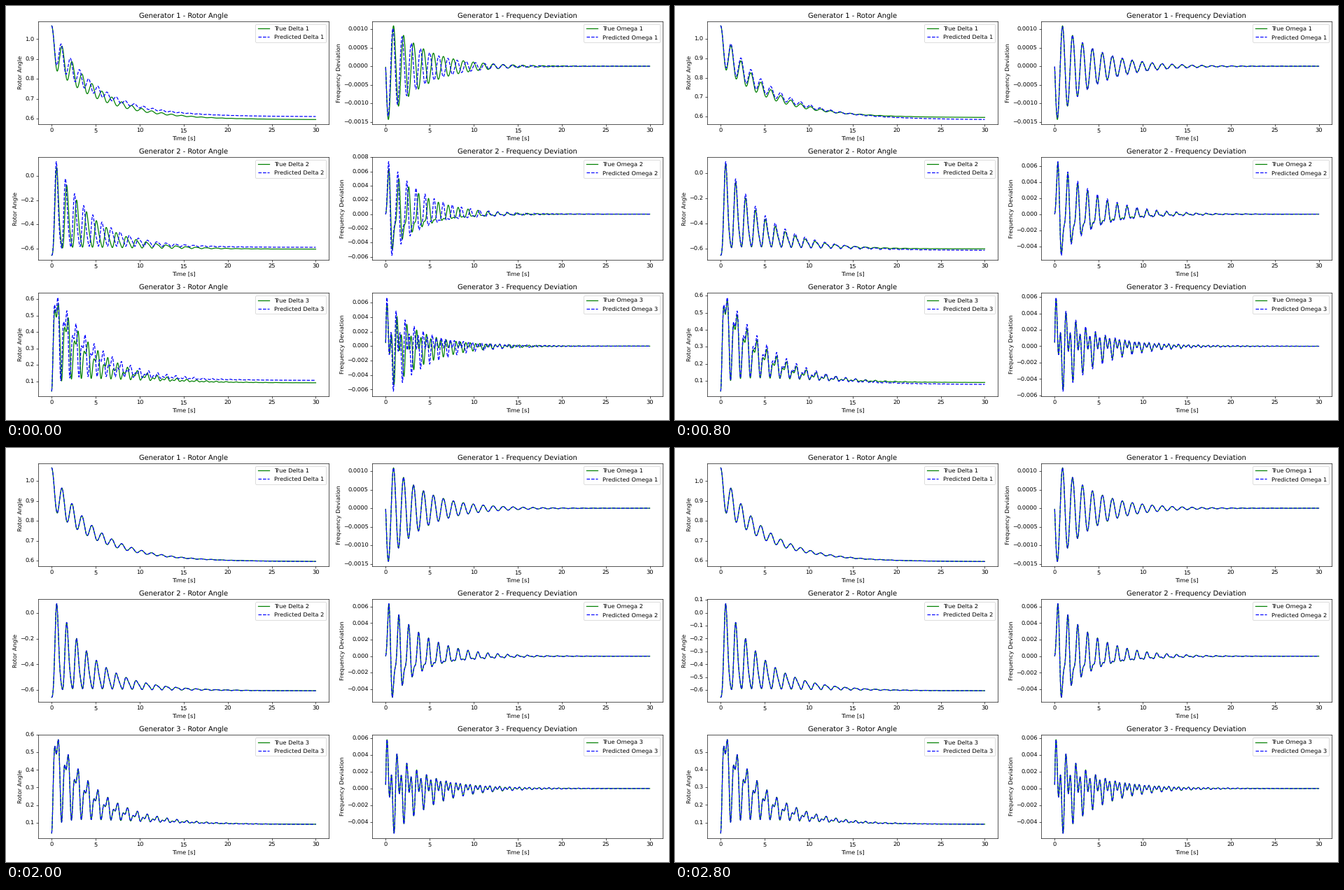
A matplotlib script that plays this animation: 947x592 px, repeating every 4.3 s.

```python
import numpy as np
import matplotlib.pyplot as plt
from matplotlib.animation import FuncAnimation

W, H = 947, 592
DPI = W / 16
STEP, FRAMES = 100, 43       # ms per frame, frames per loop
EPOCHS, HOLD = 8, 4          # fits shown, frames per fit; the last one stays

LEFT, TOP = 46.3, 21.6
WIDTH, HEIGHT = 415.0, 147.4
COLUMN, ROW = 477.1, 194.3   # pitch of the panel grid

plt.rcParams["text.hinting"] = "none"

t = np.linspace(0, 30, 3001)

# start, end: rotor angle; slow, fast: size, phase and decay of the two modes;
# drift: decay of the mean; lag: late start of the mean; gain: first size error
MACHINES = [
    dict(start=1.067, end=0.595, slow=(0.1, 0.197, 0.25), fast=(0, 0, 0),
         drift=0.2, lag=0, gain=-0.15),
    dict(start=-0.656, end=-0.605, slow=(-0.389, 0.087, 0.26),
         fast=(0.068, 0, 0.235), drift=0.21, lag=0.083, gain=0.06),
    dict(start=0.039, end=0.09, slow=(-0.2395, 0.04, 0.26),
         fast=(-0.12, 0, 0.22), drift=0.215, lag=0.055, gain=0.06),
]


def mode(params, phase, decay):
    size, shift, rate = params
    return size * np.exp(-rate * decay * t) * np.cos(phase - shift)


def swing(m, freq=1, offset=0, size=1, drift=1, decay=1):
    """Rotor angle and frequency deviation of one machine."""
    s = freq * t
    phase = 5.555 * s - 0.19 * (1 - np.exp(-1.5 * s))
    osc = size * (mode(m["slow"], phase, decay)
                  + mode(m["fast"], 11.25 * s, decay))
    end = m["end"] + offset
    level = m["start"] - end - osc[0] + m["lag"]
    mean = (level * np.exp(-m["drift"] * drift * t)
            - m["lag"] * np.exp(-2 * t))
    fade = 0.4 + 0.6 * np.exp(-3 * t)
    slope = np.gradient(osc, t) + fade * np.gradient(mean, t)
    return end + mean + osc, slope / (120 * np.pi)


def predict(m, epoch):
    """The same swing with errors that die out as training goes on."""
    fall = np.exp(-0.2 * epoch ** 2)
    return swing(m,
                 freq=1 + 0.087 * np.exp(-0.5 * epoch ** 3),
                 offset=0.015 * (1 - 1.4 * epoch) * fall,
                 size=1 + m["gain"] * np.exp(-0.65 * epoch),
                 drift=1 - 0.16 * epoch * fall,
                 decay=1 - 0.08 * epoch * fall)


def limits(*curves):
    lo, hi = np.min(curves), np.max(curves)
    pad = 0.05 * (hi - lo)
    return lo - pad, hi + pad


def add_panel(row, col, label, symbol, truth, fits):
    ax = fig.add_axes([(LEFT + col * COLUMN) / W,
                       1 - (TOP + row * ROW + HEIGHT) / H,
                       WIDTH / W, HEIGHT / H])
    ax.plot(t, truth, color="green", label=f"True {symbol} {row + 1}")
    line, = ax.plot(t, fits[0], "--", color="blue",
                    label=f"Predicted {symbol} {row + 1}")
    ax.set_title(f"Generator {row + 1} - {label}")
    ax.set_xlabel("Time [s]")
    ax.set_ylabel(label)
    ax.set_xlim(limits(t))
    ax.legend(loc="upper right")
    return ax, line, fits, [limits(truth, fit) for fit in fits]


fig = plt.figure(figsize=(16, 592.001 / DPI), dpi=DPI, facecolor="white")

panels = []
for row, machine in enumerate(MACHINES):
    angle, speed = swing(machine)
    angles, speeds = zip(*(predict(machine, k) for k in range(EPOCHS)))
    panels.append(add_panel(row, 0, "Rotor Angle", "Delta", angle, angles))
    panels.append(add_panel(row, 1, "Frequency Deviation", "Omega",
                            speed, speeds))


def update(frame):
    epoch = min(frame // HOLD, EPOCHS - 1)
    for ax, line, fits, views in panels:
        line.set_ydata(fits[epoch])
        ax.set_ylim(views[epoch])
    return [line for _, line, _, _ in panels]


anim = FuncAnimation(fig, update, frames=FRAMES, interval=STEP,
                     repeat=True, repeat_delay=0, blit=False)
plt.show()
```
